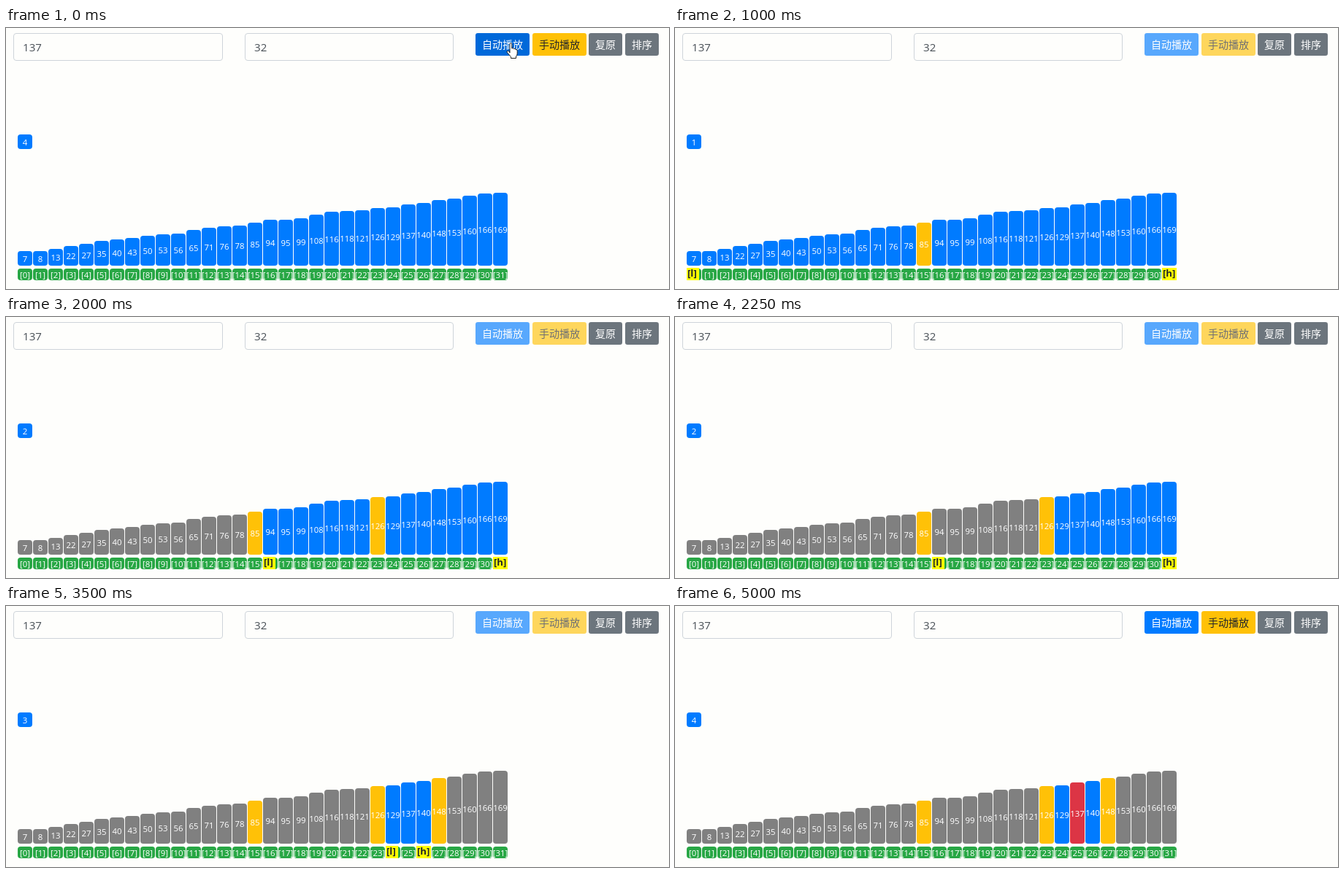
An HTML page for the animation above (6 s loop, 908x358 px).

```html
<!DOCTYPE html>
<html lang="zh">
<head>
<meta charset="utf-8">
<title>Binary search</title>
<style>
  html, body { margin: 0; width: 100%; height: 100%; overflow: hidden; background: #fefefc; }
  body { position: relative; font-family: "Open Sans", "Noto Sans", sans-serif; }
  div { position: absolute; box-sizing: border-box; white-space: nowrap; }
  .field { top: 7px; height: 38px; padding-left: 12px; border: 1px solid #ced4da; border-radius: 4px;
    font-size: 15.1px; line-height: 37px; color: #495057; }
  .button { top: 7px; height: 31px; border-radius: 3.2px; color: #fff; text-align: center;
    font: 500 14px/31px "Noto Sans CJK SC", "Noto Sans CJK", sans-serif; }
  .disabled { opacity: .65; }
  .cell { width: 20px; border-radius: 4px; color: #fff; font-size: 11.4px;
    display: flex; align-items: center; justify-content: center; }
  .tag { top: 330px; height: 16px; background: #28a745; }
  .mark { top: 329px; height: 17px; background: #ff0; color: #212529; padding-left: 1px;
    font-size: 13.2px; font-weight: 700; line-height: 14px; }
  svg { position: absolute; left: 685px; top: 20px; }
</style>
</head>
<body>
<script>
const LOOP = 6000;
const COLORS = { open: '#007bff', out: '#808080', probe: '#ffc107', found: '#dc3545' };
const values = [7, 8, 13, 22, 27, 35, 40, 43, 50, 53, 56, 65, 71, 76, 78, 85,
  94, 95, 99, 108, 116, 118, 121, 126, 129, 137, 140, 148, 153, 160, 166, 169];

// low/high bound the live bars; l/h place the markers (-1 hides them)
const steps = [
  { at: 0, count: 4, low: 0, high: 31, l: -1, h: -1, probes: [], hover: true, cursor: true },
  { at: 250, count: 0, busy: true, hover: false, ring: true },
  { at: 500, l: 0, h: 31, ring: false, cursor: false },
  { at: 750, count: 1, probes: [15] },
  { at: 1250, low: 16 },
  { at: 1500, l: 16 },
  { at: 1750, count: 2, probes: [15, 23] },
  { at: 2250, low: 24 },
  { at: 2500, l: 24 },
  { at: 2750, count: 3, probes: [15, 23, 27] },
  { at: 3250, high: 26 },
  { at: 3500, h: 26 },
  { at: 3750, count: 4, found: 25 },
  { at: 4250, l: -1, h: -1, busy: false }
];
const states = [];
steps.forEach((step, i) => states.push({ ...states[i - 1], ...step }));

function add(className, text, style) {
  const el = document.createElement('div');
  el.className = className;
  el.textContent = text;
  Object.assign(el.style, style);
  document.body.append(el);
  return el;
}
const px = n => n + 'px';
const slotX = i => 16 + 21 * i;

add('field', '137', { left: '10px', width: '287px' });
add('field', '32', { left: '327px', width: '286px' });

const button = (text, x, width, background, color = '') =>
  add('button', text, { left: px(x), width: px(width), background, color });
const auto = button('自动播放', 643, 74, COLORS.open);
const manual = button('手动播放', 721, 74, COLORS.probe, '#212529');
button('复原', 798, 46, '#6c757d');
button('排序', 848, 46, '#6c757d');

const counter = add('cell', '', { left: '16px', top: '146px', height: '20px', background: COLORS.open });

const bars = values.map((value, i) => {
  const height = Math.round(20 + (value - 7) * 80 / 162);
  return add('cell', value, { left: px(slotX(i)), top: px(326 - height), height: px(height) });
});
const tags = values.map((_, i) => add('cell tag', `[${i}]`, { left: px(slotX(i)) }));
const lowMark = add('mark', '[l]', { width: '17px' });
const highMark = add('mark', '[h]', { width: '20px' });

document.body.insertAdjacentHTML('beforeend', `
  <svg id="cursor" width="17" height="23" viewBox="0 0 17 23">
    <path d="M5 14V2.5Q5 .8 6.4.8T7.8 2.5V8Q9.7 6.6 10.4 8.7 12.1 7.6 12.8 9.4 15.2 8.7 15.2 11.5V15Q15.2 17.5 13.5 19V21.5H6.5V19.5L1.2 13.3Q.7 11.5 2.4 11.2 3.6 11.2 5 14Z"
      fill="#fff" stroke="#222" stroke-width="1"/>
  </svg>`);
const cursor = document.getElementById('cursor');

function barState(i, s) {
  if (i === s.found) return 'found';
  if (s.probes.includes(i)) return 'probe';
  return i < s.low || i > s.high ? 'out' : 'open';
}

function placeMark(el, slot) {
  el.style.display = slot < 0 ? 'none' : '';
  el.style.left = px(slotX(slot));
}

function render(s) {
  counter.textContent = s.count;
  bars.forEach((bar, i) => { bar.style.background = COLORS[barState(i, s)]; });
  tags.forEach((tag, i) => { tag.style.color = i === s.l || i === s.h ? 'transparent' : ''; });
  placeMark(lowMark, s.l);
  placeMark(highMark, s.h);
  auto.style.background = s.hover ? '#0069d9' : COLORS.open;
  auto.style.boxShadow = s.ring ? '0 0 0 3.2px #80bdff' : 'none';
  for (const el of [auto, manual]) el.classList.toggle('disabled', !!s.busy);
  cursor.style.display = s.cursor ? '' : 'none';
}

const start = performance.now();
let shown;
function tick() {
  const time = (performance.now() - start) % LOOP;
  const state = states.findLast(s => s.at <= time);
  if (state !== shown) render(shown = state);
  requestAnimationFrame(tick);
}
tick();
</script>
</body>
</html>
```
